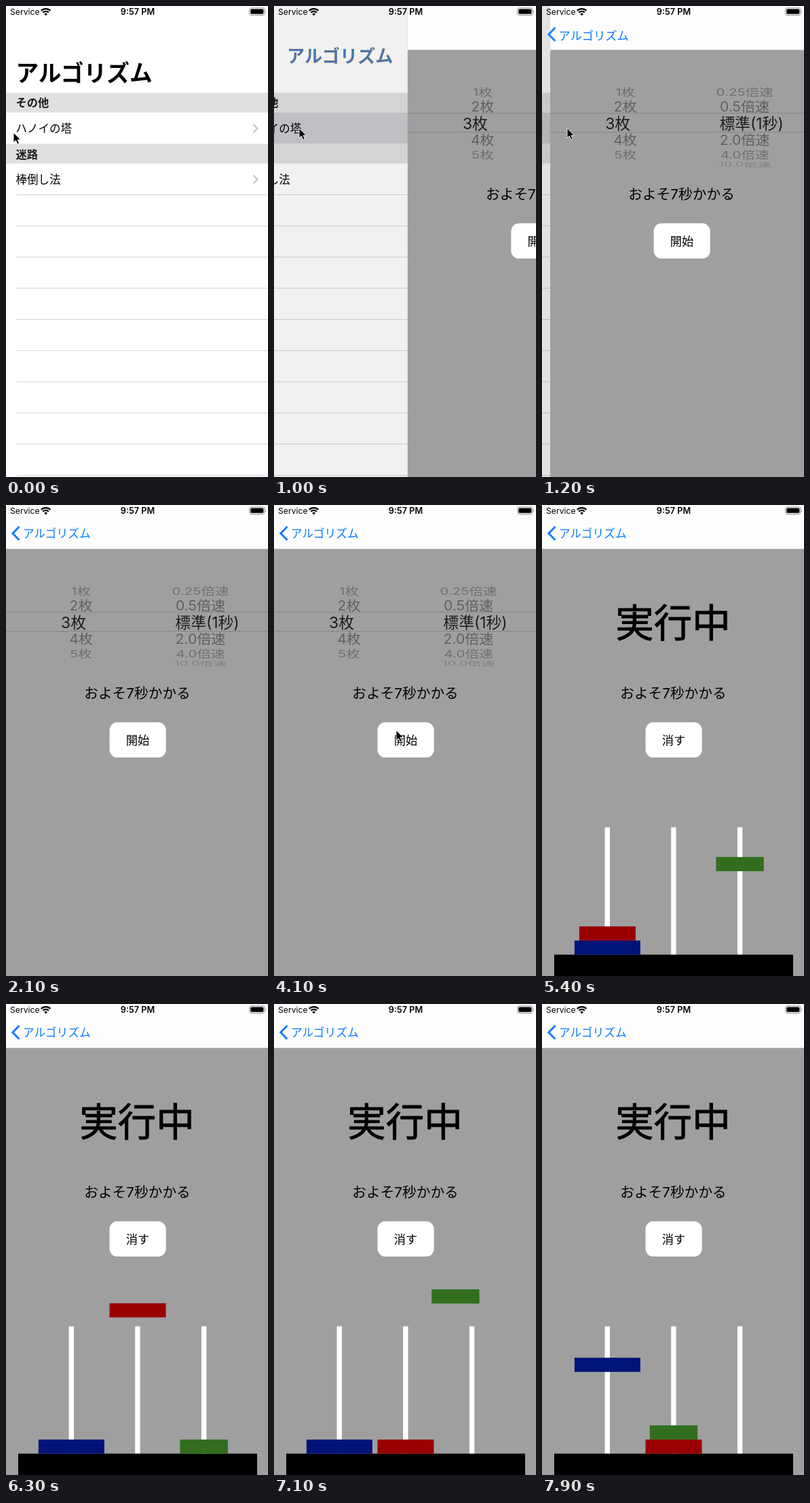
These frames come from a looping animation (386x692 px, 8000 ms). An HTML page:

```html
<!DOCTYPE html>
<html lang="ja">
<head>
<meta charset="utf-8">
<style>
  html, body { margin: 0; width: 100%; height: 100%; overflow: hidden; background: #fff; }
  svg { display: block; width: 386px; height: 692px; }
  text { font-family: Inter, "Noto Sans CJK JP", "Noto Sans CJK", sans-serif; white-space: pre; }
  .mid { text-anchor: middle; }
  .head { font-weight: 700; font-size: 16.3px; fill: #1c1c1c; }
  .row { font-size: 16.5px; }
</style>
</head>
<body>
<svg viewBox="0 0 386 692">
  <g id="list">
    <rect width="386" height="692" fill="#fff"/>
    <rect y="127.5" width="386" height="29" fill="#e0e0e0"/>
    <rect id="highlight" y="156.5" width="386" height="46" fill="#cacacf"/>
    <rect y="202.5" width="386" height="29" fill="#e0e0e0"/>
    <text class="head" x="14.5" y="148.3">その他</text>
    <text class="row" x="14.5" y="186">ハノイの塔</text>
    <text class="head" x="14.5" y="223.5">迷路</text>
    <text class="row" x="14.5" y="261">棒倒し法</text>
    <path d="M364.5 174l6 6-6 6M364.5 248.8l6 6-6 6" fill="none" stroke="#c3c3c6" stroke-width="2.1"/>
    <g id="separators" stroke="#d2d2d5"/>
    <rect id="dim" width="386" height="692"/>
  </g>

  <g id="page">
    <rect width="386" height="692" fill="#9f9f9f"/>
    <rect width="386" height="64.5" fill="#fdfdfd"/>
    <g id="setup">
      <path d="M0 157.5H386M0 185.5H386" stroke="#868686"/>
      <g id="pickers"></g>
    </g>
    <text id="running" class="mid" x="193" y="193.5" font-size="56.5"
      stroke="#000" stroke-width=".9" stroke-linejoin="round">実行中</text>
    <text class="mid" x="193.5" y="283.5" font-size="20.7">およそ7秒かかる</text>
    <rect x="152.5" y="319.3" width="83.2" height="51.7" rx="11.5" fill="#fff"/>
    <text id="button" class="mid" x="194" y="351.7" font-size="17.3"></text>
    <g id="tower">
      <path d="M96.3 473.5V661M193.9 473.5V661M291.6 473.5V661" stroke="#fff" stroke-width="7.4"/>
      <rect x="18" y="660.6" width="352" height="31.4"/>
      <g id="disks"></g>
    </g>
  </g>

  <path id="chevron" d="M19.5 31.8L9.8 41.7l9.7 9.9" fill="none" stroke="#0a7aff" stroke-width="2.9"/>
  <text class="title" font-weight="700">アルゴリズム</text>
  <text class="title" fill="#0a7aff">アルゴリズム</text>

  <g id="status">
    <text x="6" y="13.2" font-size="12.2">Service</text>
    <g fill="none" stroke="#000" stroke-width="2.2">
      <path d="M51.8 6.9a9.6 9.6 0 0 1 13.6 0M54.4 9.6a6 6 0 0 1 8.4 0"/>
    </g>
    <path d="M58.6 14.2l-2.3-2.5a3.3 3.3 0 0 1 4.6 0z"/>
    <text class="mid" x="194" y="13.2" font-size="12.7" font-weight="600">9:57 PM</text>
    <rect x="358.5" y="2.9" width="22.6" height="10.6" rx="3" fill="none" stroke="#8e8e8e"/>
    <rect x="360.2" y="4.6" width="19.2" height="7.2" rx="1.6"/>
    <path d="M382.3 6.4q2 1.8 0 3.6z" fill="#8e8e8e"/>
  </g>
  <path id="cursor" d="M0 0V14.5L3.4 11.5 5.8 17 8.4 15.9 6 10.5H10.6Z" stroke="#fff" stroke-width=".9"/>
</svg>
<script>
const $ = id => document.getElementById(id);
const clamp = v => Math.min(1, Math.max(0, v));
const lerp = (a, b, p) => a + (b - a) * p;
const ramp = (t, from, to) => clamp((t - from) / (to - from));
const smooth = p => p * p * (3 - 2 * p);
const show = (el, on) => el.style.display = on ? '' : 'none';

$('separators').innerHTML = Array.from({ length: 10 }, (_, i) =>
  `<path d="M15 ${277.3 + i * 45.8}H386"/>`).join('');

// Picker rows lie on a cylinder: the angle gives height and foreshortening.
function wheel(items, selected, selectedX, sideX) {
  return items.map((label, i) => {
    const step = i - selected, angle = step * 0.377, far = Math.abs(step);
    const size = far ? 21.7 - far * 0.6 : 22.8;
    const y = 172 + 67 * Math.sin(angle);
    return `<text class="mid" font-size="${size}" y="${size * 0.38}"
      opacity="${[0.82, 0.4, 0.3, 0.2][far]}"
      transform="translate(${far ? sideX : selectedX} ${y}) scale(1 ${Math.cos(angle)})">${label}</text>`;
  }).join('');
}
$('pickers').innerHTML =
  wheel(['1枚', '2枚', '3枚', '4枚', '5枚'], 2, 99.5, 110.5) +
  wheel(['0.25倍速', '0.5倍速', '標準(1秒)', '2.0倍速', '4.0倍速', '10.0倍速'], 2, 296.5, 286.5);

const PEGS = [96.4, 194, 291.6], DISK_H = 20.8, LIFT_Y = 419.3;
const levelY = level => 660.7 - DISK_H * (level + 1);
const DISKS = [[70.4, '#326e1e'], [83, '#990000'], [97, '#001478']];
$('disks').innerHTML = DISKS.map(([w, color]) =>
  `<rect width="${w}" height="${DISK_H}" fill="${color}"/>`).join('');
const MOVES = [
  { start: 4615, disk: 0, to: 2 },
  { start: 5625, disk: 1, to: 1 },
  { start: 6635, disk: 0, to: 1 },
  { start: 7688, disk: 2, to: 2 },
];

function drawTower(t) {
  const stacks = [[2, 1, 0], [], []], pos = [];
  const place = () => stacks.forEach((stack, peg) =>
    stack.forEach((disk, level) => pos[disk] = [PEGS[peg], levelY(level)]));
  place();
  for (const { start, disk, to } of MOVES) {
    if (t < start) break;
    const [x0, y0] = pos[disk];
    stacks.find(s => s.includes(disk)).pop();
    stacks[to].push(disk);
    place();
    const [x1, y1] = pos[disk];
    const up = smooth(ramp(t, start, start + 400));
    const side = smooth(ramp(t, start + 400, start + 600));
    const down = smooth(ramp(t, start + 600, start + 1000));
    pos[disk] = [lerp(x0, x1, side), down ? lerp(LIFT_Y, y1, down) : lerp(y0, LIFT_Y, up)];
  }
  [...$('disks').children].forEach((rect, i) => {
    rect.setAttribute('x', pos[i][0] - DISKS[i][0] / 2);
    rect.setAttribute('y', pos[i][1]);
  });
}

function drawPush(t) {
  const w = Math.max(0, t - 910) * 0.0183;
  const p = t >= 1500 ? 1 : 1 - (1 + w) * Math.exp(-w);
  const q = p ** 1.15;
  $('list').setAttribute('transform', `translate(${-115.8 * p})`);
  $('page').setAttribute('transform', `translate(${386 * (1 - p)})`);
  $('dim').setAttribute('opacity', 0.115 * p);
  $('chevron').setAttribute('opacity', clamp(2 * p - 1));
  show($('highlight'), t >= 800);
  document.querySelectorAll('.title').forEach((title, i) => {
    title.setAttribute('x', lerp(14.5, 25, q));
    title.setAttribute('y', lerp(111, 48, q));
    title.setAttribute('font-size', lerp(33.7, 16.7, q));
    title.setAttribute('opacity', i ? p : 1 - p);
  });
}

function drawCursor(t) {
  let x, y;
  if (t < 3000) {
    const p = ramp(t, 0, 200);
    [x, y] = [lerp(11, 37, p), lerp(186, 179.5, p)];
  } else {
    const p = ramp(t, 3200, 3500);
    [x, y] = [lerp(83, 180, p), lerp(190.5, 286, p) + lerp(0, 45, ramp(t, 3600, 4100))];
  }
  $('cursor').setAttribute('transform', `translate(${x} ${y})`);
  show($('cursor'), t < 1300 || (t >= 3000 && t < 5000));
}

function frame() {
  const t = Math.floor(performance.now() % 8000 / 100) * 100;
  const running = t >= 4700;
  show($('setup'), !running);
  show($('running'), running);
  show($('tower'), running);
  $('button').textContent = running ? '消す' : '開始';
  drawPush(t);
  drawTower(t);
  drawCursor(t);
  requestAnimationFrame(frame);
}
frame();
</script>
</body>
</html>
```
